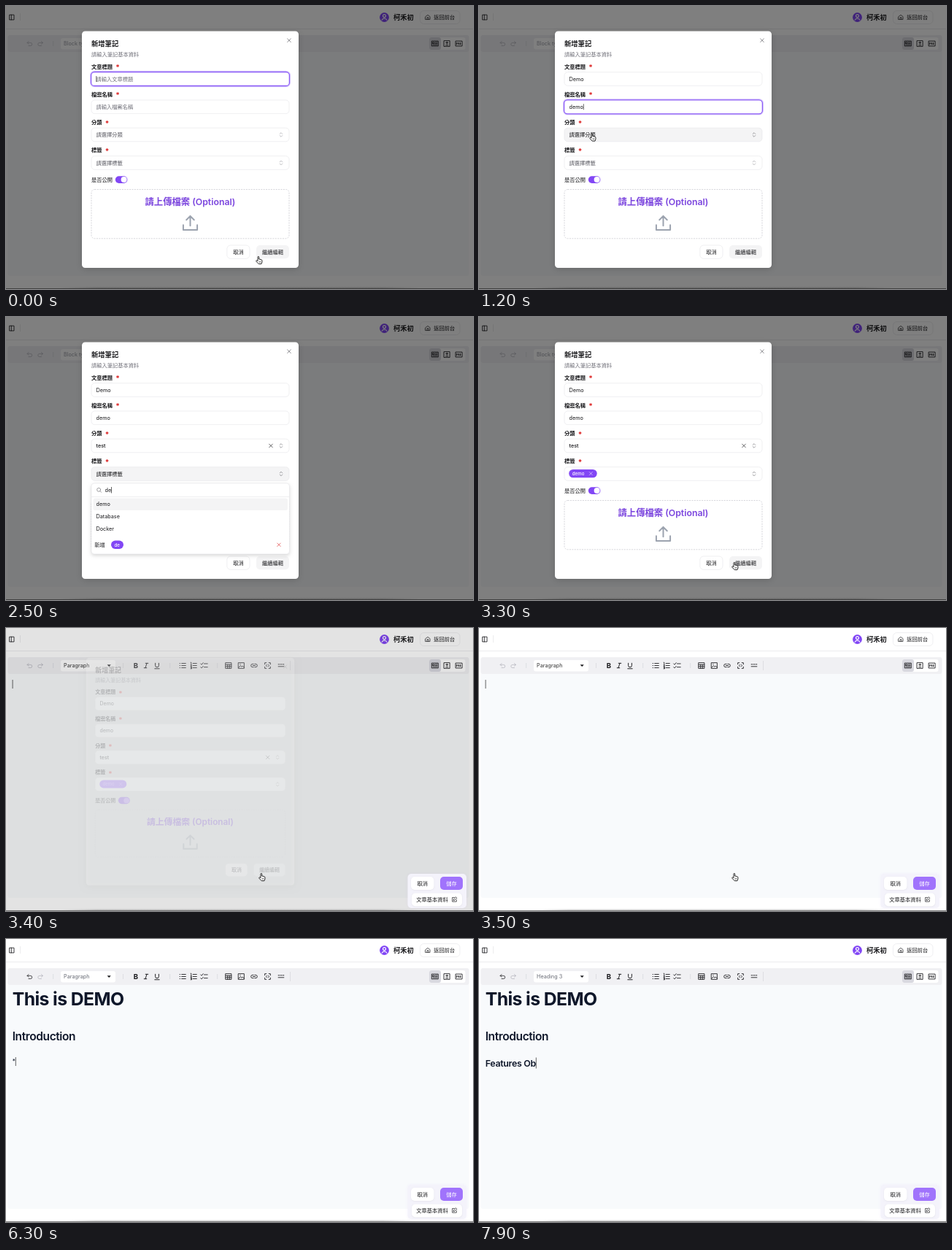
Animation, 640 px wide and 388 px high, one loop 8000 ms. Source, as an HTML page with a canvas:

```html
<!DOCTYPE html>
<html lang="zh-Hant">
<head>
<meta charset="utf-8">
<title>Note editor</title>
<style>
html, body { margin: 0; width: 100%; height: 100%; overflow: hidden; background: #fff; }
canvas { display: block; width: 640px; height: 388px; }
</style>
</head>
<body>
<canvas id="stage"></canvas>
<script>
const LOOP = 8000, W = 640, H = 388;
const FONT = 'Inter, "Noto Sans CJK TC", "Noto Sans CJK", "Noto Sans", sans-serif';
const INK = '#18181b', MUTED = '#71717a', LINE = '#e4e4e7', SOFT = '#f4f4f5', PURPLE = '#8247f5', RED = '#dc2626';
const CLOSE_AT = 3305, CLOSE_MS = 200;

const canvas = document.getElementById('stage');
const ctx = canvas.getContext('2d');
const dpr = window.devicePixelRatio || 1;
canvas.width = W * dpr;
canvas.height = H * dpr;

const between = (t, a, b) => t >= a && t < b;
const clamp01 = v => Math.max(0, Math.min(1, v));
const lerp = (a, b, p) => a + (b - a) * p;

// cubic-bezier(.25, .1, .25, 1)
function ease(x) {
  if (x <= 0) return 0;
  if (x >= 1) return 1;
  let lo = 0, hi = 1, u = x;
  for (let i = 0; i < 20; i++) {
    u = (lo + hi) / 2;
    const bx = .75 * u * (1 - u) * (1 - u) + .75 * u * u * (1 - u) + u * u * u;
    if (bx < x) lo = u; else hi = u;
  }
  return .3 * u * (1 - u) * (1 - u) + 3 * u * u * (1 - u) + u * u * u;
}

function typed(s, t, start, step) {
  return s.slice(0, Math.max(0, Math.floor((t - start) / step) + 1));
}

function box(x, y, w, h, r, fill, stroke, lw = .6) {
  ctx.beginPath();
  ctx.roundRect(x, y, w, h, r);
  if (fill) { ctx.fillStyle = fill; ctx.fill(); }
  if (stroke) { ctx.strokeStyle = stroke; ctx.lineWidth = lw; ctx.stroke(); }
}

function shadowBox(x, y, w, h, r, fill, blur, color, dy = 2) {
  ctx.save();
  ctx.shadowColor = color;
  ctx.shadowBlur = blur * dpr;
  ctx.shadowOffsetY = dy * dpr;
  box(x, y, w, h, r, fill);
  ctx.restore();
}

// y is the vertical middle of the line; returns the advance width
function text(s, x, y, size = 7.25, weight = 400, color = INK, align = 'left', track = 0) {
  ctx.font = `${weight} ${size}px ${FONT}`;
  ctx.letterSpacing = `${track * size}px`;
  ctx.textAlign = align;
  ctx.fillStyle = color;
  ctx.fillText(s, x, y + size * .365);
  const w = ctx.measureText(s).width;
  ctx.letterSpacing = '0px';
  return w;
}

function icon(d, cx, cy, size, color = INK, lw = 2) {
  ctx.save();
  ctx.translate(cx - size / 2, cy - size / 2);
  ctx.scale(size / 24, size / 24);
  ctx.lineCap = ctx.lineJoin = 'round';
  ctx.strokeStyle = color;
  ctx.lineWidth = lw;
  ctx.stroke(new Path2D(d));
  ctx.restore();
}

function caret(x, y1, y2, color = '#222') {
  ctx.fillStyle = color;
  ctx.fillRect(x, y1, .7, y2 - y1);
}

const ICON = {
  panel: 'M4 3h16v18H4zM10 3v18',
  home: 'M3 10l9-7 9 7v11H3zM9 21v-8h6v8',
  edit: 'M11 4H4v16h16v-7M18 2.5l3.5 3.5L13 14.5l-4.5 1 1-4.5z',
  undo: 'M8 4L3 9l5 5M3 9h12a5.5 5.5 0 0 1 0 11H8',
  redo: 'M16 4l5 5-5 5M21 9H9a5.5 5.5 0 0 0 0 11h7',
  bullets: 'M9 5h13M9 12h13M9 19h13M3 5h1M3 12h1M3 19h1',
  numbers: 'M10 5h12M10 12h12M10 19h12M3 2h1.5v5M3 10h3l-3 4h3M3 17h3v5H3M4 19.5h2',
  checks: 'M12 6h11M12 17h11M1 6l3 3 5-6M1 17l3 3 5-6',
  table: 'M3 3h18v18H3zM3 9h18M3 15h18M9 9v12M15 9v12',
  image: 'M3 3h18v18H3zM4 18l5-6 4 4 3-3 5 5M8 7.5h1',
  link: 'M10 7H7a5 5 0 0 0 0 10h3M14 7h3a5 5 0 0 1 0 10h-3M8 12h8',
  code: 'M8 3H3v5M16 3h5v5M8 21H3v-5M16 21h5v-5M10 9l-3 3 3 3M14 9l3 3-3 3',
  rule: 'M3 8h4M10 8h4M17 8h4M3 15h18',
  rich: 'M2 4h20v16H2zM5 8h5v4H5zM13 8h6M13 12h6M5 16h14',
  diff: 'M3 3h18v18H3zM12 6v7M8.5 9.5h7M8.5 17h7',
  md: 'M2 4h20v16H2zM5 15V9l3 3 3-3v6M16 9v6M14 13l2 2 2-2',
  cross: 'M5 5l14 14M19 5L5 19',
  updown: 'M7 15l5 5 5-5M7 9l5-5 5 5',
  search: 'M18 11a7 7 0 1 1-14 0a7 7 0 1 1 14 0M16 16l5 5',
  check: 'M4 12l5 5L20 6',
  upload: 'M2 15v7h20v-7M12 16V2M6.5 7.5L12 2l5.5 5.5'
};

function header() {
  ctx.fillStyle = '#fff';
  ctx.fillRect(0, 0, W, H);
  ctx.fillStyle = LINE;
  ctx.fillRect(0, 31, W, .7);
  ctx.fillRect(19, 10, .7, 10);
  icon(ICON.panel, 8, 15.5, 9, INK, 2.2);
  ctx.fillStyle = PURPLE;
  ctx.beginPath();
  ctx.arc(518.5, 15.5, 6.4, 0, 7);
  ctx.fill();
  ctx.strokeStyle = '#fff';
  ctx.lineWidth = 1.1;
  ctx.beginPath();
  ctx.arc(518.5, 13.6, 2, 0, 7);
  ctx.stroke();
  ctx.beginPath();
  ctx.arc(518.5, 20.8, 3.7, Math.PI * 1.1, Math.PI * 1.9);
  ctx.stroke();
  text('柯禾初', 531, 15.5, 9.3, 600);
  box(567.5, 6.5, 54.5, 18, 5, '#fff', LINE);
  icon(ICON.home, 578, 15.3, 8.2);
  text('返回前台', 586.3, 15.5, 7.25, 500);
}

function toolbar(label, ready, hasUndo, strong) {
  box(2.5, 40, 632, 330, 3, '#f8fafc');
  box(2.5, 40, 632, 23, 3, '#f0f0f3');
  const pale = '#b4b5bc';
  icon(ICON.undo, 32.5, 51.5, 9, hasUndo ? INK : pale);
  icon(ICON.redo, 47, 51.5, 9, pale);
  ctx.fillStyle = '#d0d1d7';
  for (const x of [64.5, 160, 224.5, 289.5, 389]) {
    const tall = x === 389 ? 3 : 0;
    ctx.fillRect(x, 48 - tall, .6, 7 + tall * 2);
  }
  box(75, 44, 75, 15.5, 3, '#fff');
  text(label, 79, 51.8, 7.25, 400, ready ? (strong ? '#333' : '#666973') : '#9a9ca5');
  ctx.fillStyle = INK;
  ctx.beginPath();
  ctx.moveTo(138.6, 50.3);
  ctx.lineTo(143.8, 50.3);
  ctx.lineTo(141.2, 53);
  ctx.fill();
  if (ready) {
    text('B', 178, 51.6, 9.5, 700, INK, 'center');
    icon('M10 4h9M5 20h9M14.5 4l-5 16', 192, 51.5, 9.5, INK, 2.4);
    icon('M6 3v8a6 6 0 0 0 12 0V3M4 22h16', 207, 51.8, 9.5, INK, 2.4);
    const tools = ['bullets', 'numbers', 'checks', 'table', 'image', 'link', 'code', 'rule'];
    [242, 257, 271.5, 305, 322.5, 340, 358.5, 377].forEach((x, i) => icon(ICON[tools[i]], x, 51.5, 10.3));
  }
  box(580, 43, 49.5, 17, 3, '#fff');
  box(580, 43, 16, 17, 3, '#d9d9e0');
  icon(ICON.rich, 588, 51.5, 10.3);
  icon(ICON.diff, 604.3, 51.5, 10.3);
  icon(ICON.md, 620.8, 51.5, 10.3);
}

function bottomEdge() {
  const g = ctx.createLinearGradient(75, 0, 565, 0);
  g.addColorStop(0, 'rgba(120,120,120,0)');
  g.addColorStop(.1, 'rgba(120,120,120,.3)');
  g.addColorStop(.9, 'rgba(120,120,120,.3)');
  g.addColorStop(1, 'rgba(120,120,120,0)');
  ctx.fillStyle = g;
  ctx.fillRect(75, 385.5, 490, 1.5);
  ctx.fillStyle = '#808080';
  ctx.fillRect(0, 387, W, 1);
}

const STYLE = {
  'Paragraph': { size: 8.3, weight: 400, track: 0, half: 6 },
  'Heading 1': { size: 24.8, weight: 700, track: -.025, half: 14.5 },
  'Heading 2': { size: 15.5, weight: 600, track: -.025, half: 9 },
  'Heading 3': { size: 12.4, weight: 600, track: -.025, half: 7.5 }
};

// Markdown marks become a heading at `at`, then the title is typed
function heading(level, t, at, marks, title, start, step) {
  if (t >= at) return ['Heading ' + level, typed(title, t, start, step)];
  return ['Paragraph', '#'.repeat(marks.filter(m => t >= m).length)];
}

function docAt(t) {
  const lines = [];
  const add = (y, py, [kind, s]) => lines.push({ kind, s, y: kind === 'Paragraph' ? py : y });
  add(82, 77, heading(1, t, 3990, [3790], 'This is DEMO', 4060, 36));
  if (t >= 4690) add(133.8, 123, heading(2, t, 5090, [4890, 4990], 'Introduction', 5150, 40));
  if (t >= 5690) {
    add(170, 168, between(t, 5990, 6490) ? ['Paragraph', '*']
      : heading(3, t, 7250, [6690, 6890, 7090], 'Features Ob', 7380, 48));
  }
  return lines;
}

function writing(lines, t) {
  let x = 9;
  lines.forEach(({ kind, s, y }) => {
    const st = STYLE[kind];
    x = 8.7 + text(s, 8.7, y, st.size, st.weight, '#0f172a', 'left', st.track);
  });
  const last = lines[lines.length - 1], half = STYLE[last.kind].half;
  const off = between(t, 3590, 3690) || between(t, 5890, 5990) || between(t, 6190, 6290);
  if (!off) caret(x, last.y - half, last.y + half);
}

function savePanel() {
  shadowBox(550.5, 337, 80.5, 47, 5, '#f4f3fb', 4, 'rgba(130,71,245,.06)', 0);
  const soft = 'rgba(0,0,0,.07)';
  shadowBox(555, 341, 31.5, 18, 5, '#fff', 2, soft, .5);
  text('取消', 570.8, 350, 7.25, 500, INK, 'center');
  box(595, 341, 31, 18, 5, '#a073fc');
  text('儲存', 610.5, 350, 7.25, 500, '#fff', 'center');
  shadowBox(556, 363.5, 69, 18, 5, '#fff', 2, soft, .5);
  text('文章基本資料', 562.3, 372.5, 7.25, 500);
  icon(ICON.edit, 614.5, 372.3, 8.5);
}

function label(s, y) {
  text(s, 117, y, 7.25, 600);
  text('*', 153 - (4 - s.length) * 7.25, y + 1.6, 10, 700, RED, 'center');
}

function field(y, value, hint, focused) {
  if (focused) {
    box(116.2, y - 10, 272.6, 20, 5, '#fff', 'rgba(139,92,246,.3)', 2.6);
    box(116.6, y - 9.5, 271.8, 19, 4.6, '#fff', '#8b5cf6', 1.3);
  } else box(117, y - 9.3, 271, 18.6, 4.5, '#fff', LINE);
  const w = text(value || hint, 123.5, y, 7.25, 400, value ? INK : MUTED);
  if (focused) caret(123.5 + (value ? w : 0), y - 4, y + 4);
}

function picker(y, value, hint, hot) {
  box(117, y - 9.3, 271, 18.6, 4.5, hot ? SOFT : '#fff', LINE);
  if (value !== 'badge') text(value || hint, 123.5, y, 7.25, 500, value || hot ? INK : '#5b5b63');
  icon(ICON.updown, 377, y, 8.5, hot || value ? '#77777c' : '#a5a5aa');
}

function badge(x, y, s, w) {
  box(x, y - 5.7, w, 11.4, 5.7, PURPLE);
  text(s, x + 4.5, y, 6.2, 500, '#fff');
}

const CATEGORIES = ['Backend', 'Frontend', 'test', 'Database', 'Design', 'Tools', 'Notes', 'Others'];
const TAGS = ['demo', 'Database', 'Docker', 'JavaScript', 'Linux', 'Python', 'React', 'Vue'];

function popover(y, h, items, active, query, appear, picked) {
  const p = ease(clamp01(appear)), s = lerp(.95, 1, p);
  ctx.save();
  ctx.globalAlpha = p;
  ctx.translate(252.5, y);
  ctx.scale(s, s);
  ctx.translate(-252.5, -y);
  shadowBox(117, y, 271.5, h, 4, '#fff', 5, 'rgba(0,0,0,.16)');
  box(117, y, 271.5, h, 4, null, LINE);
  icon(ICON.search, 127.5, y + 9.2, 8.5, '#77777c');
  const w = text(query || '搜尋...', 135.5, y + 9.3, 7.25, 400, query ? INK : MUTED);
  caret(135.5 + (query ? w : 0), y + 5, y + 13.5);
  ctx.fillStyle = LINE;
  ctx.fillRect(117, y + 18.2, 271.5, .6);
  ctx.beginPath();
  ctx.rect(117, y + 19, 271, h - 20);
  ctx.clip();
  items.forEach((name, i) => {
    const cy = y + 28.8 + i * 16.6;
    if (i === active) box(119.5, cy - 8.2, 266.5, 16.4, 2.5, SOFT);
    text(name, 123.5, cy, 7.25);
    if (name === picked) icon(ICON.check, 378, cy, 8);
  });
  if (query) {
    text('新增', 121.3, y + 84.5);
    badge(144, y + 84.3, query, query.length > 1 ? 17 : 13.5);
    icon(ICON.cross, 374, y + 84.3, 7.6, RED);
  }
  ctx.restore();
}

function dialog(t) {
  const p = ease(clamp01((t - CLOSE_AT) / CLOSE_MS)), s = lerp(1, .95, p);
  ctx.save();
  ctx.globalAlpha = 1 - p;
  ctx.translate(252.5, 197);
  ctx.scale(s, s);
  ctx.translate(-252.5, -197);
  shadowBox(104, 34.5, 297, 324.5, 4.5, '#fff', 8, 'rgba(0,0,0,.15)');
  text('新增筆記', 117, 51.8, 9.3, 600);
  text('請輸入筆記基本資料', 117, 66, 7.25, 400, MUTED);
  icon(ICON.cross, 388, 47.2, 8, '#55555b');

  label('文章標題', 83);
  field(100, typed('Demo', t, 290, 120), '請輸入文章標題', t < 790);
  label('檔案名稱', 121.2);
  field(138.3, typed('demo', t, 890, 85), '請輸入檔案名稱', between(t, 790, 1290));

  label('分類', 159.5);
  const chosen = t >= 1690, tagged = t >= 2690;
  picker(176.5, chosen ? 'test' : '', '請選擇分類', between(t, 1150, 1790));
  if (chosen) icon(ICON.cross, 363, 176.5, 8);
  label('標籤', 197.7);
  picker(215, tagged ? 'badge' : '', '請選擇標籤', between(t, 1850, 2950));
  if (tagged) {
    badge(123.2, 214.6, 'demo', 38.5);
    icon(ICON.cross, 153.3, 214.6, 6.5, '#fff');
  }

  text('是否公開', 117, 238, 7.25, 500);
  box(149.8, 233.2, 16.6, 9.8, 4.9, PURPLE);
  ctx.fillStyle = '#fff';
  ctx.beginPath();
  ctx.arc(161.6, 238.1, 4, 0, 7);
  ctx.fill();

  ctx.setLineDash([2, 1.4]);
  box(117, 251.5, 271, 67.3, 4.5, null, '#cbcbd1', .8);
  ctx.setLineDash([]);
  text('請上傳檔案 (Optional)', 252.5, 269, 12.3, 600, '#7b45de', 'center');
  icon(ICON.upload, 252.5, 297.5, 23, '#9ca3af', 2.1);

  box(302.8, 328, 31.2, 18.3, 5, '#fff', LINE);
  text('取消', 318.5, 337.2, 7.25, 500, INK, 'center');
  box(343, 328, 45, 18.3, 5, SOFT);
  text('繼續編輯', 365.5, 337.2, 7.25, 500, INK, 'center');

  if (between(t, 1290, 1700)) popover(189.5, 165, CATEGORIES, t < 1600 ? 0 : 2, '', (t - 1250) / 150);
  if (between(t, 1950, 2950)) {
    if (between(t, 2290, 2690)) popover(228, 97, TAGS.slice(0, 3), 0, t < 2450 ? 'd' : 'de', 1);
    else popover(36, 166, TAGS, 0, '', (t - 1900) / 150, tagged ? 'demo' : '');
  }
  ctx.restore();
}

const HAND = new Path2D('M3 6V1.3a.85.85 0 0 1 1.7 0V4l3 .6a1.5 1.5 0 0 1 1.2 1.5V8L8 10.6H4.2L1 7.2a.85.85 0 0 1 1.2-1.2L3 6.7z');
const PATH = [
  [0, 342, 343], [1090, 168, 168], [1190, 151, 174.5], [1500, 151, 174.5], [1620, 146, 246], [1720, 146, 246],
  [1860, 160, 211], [2690, 160, 211], [2900, 240, 260], [3150, 346, 336], [8000, 346, 336]
];

function pointer(t) {
  if (!(t < 190 || between(t, 1090, 2200) || between(t, 2790, 3690))) return;
  const i = t < 190 ? 0 : PATH.findIndex((k, n) => n > 0 && t < k[0]) - 1;
  const a = PATH[i], b = PATH[i + 1];
  const p = i === 0 ? 0 : (t - a[0]) / (b[0] - a[0]);
  ctx.save();
  ctx.translate(lerp(a[1], b[1], p), lerp(a[2], b[2], p));
  ctx.lineJoin = 'round';
  ctx.fillStyle = '#fff';
  ctx.strokeStyle = '#111';
  ctx.lineWidth = .9;
  ctx.fill(HAND);
  ctx.stroke(HAND);
  ctx.beginPath();
  ctx.moveTo(5.1, 6.8); ctx.lineTo(5.1, 8.8);
  ctx.moveTo(6.7, 6.8); ctx.lineTo(6.7, 8.8);
  ctx.lineWidth = .6;
  ctx.stroke();
  ctx.restore();
}

function draw(t) {
  ctx.setTransform(dpr, 0, 0, dpr, 0, 0);
  const ready = t >= CLOSE_AT;
  const lines = docAt(t);
  header();
  toolbar(ready ? lines[lines.length - 1].kind : 'Block type', ready, t >= 3790, t < 3790);
  if (ready) writing(lines, t);
  bottomEdge();
  const fade = 1 - ease(clamp01((t - CLOSE_AT) / CLOSE_MS));
  if (fade > 0) {
    ctx.fillStyle = `rgba(0,0,0,${.5 * fade})`;
    ctx.fillRect(0, 0, W, H);
  }
  if (ready) savePanel();
  if (fade > 0) dialog(t);
  pointer(t);
}

const begin = performance.now();
function tick() {
  draw((performance.now() - begin) % LOOP);
  requestAnimationFrame(tick);
}
tick();
</script>
</body>
</html>
```
